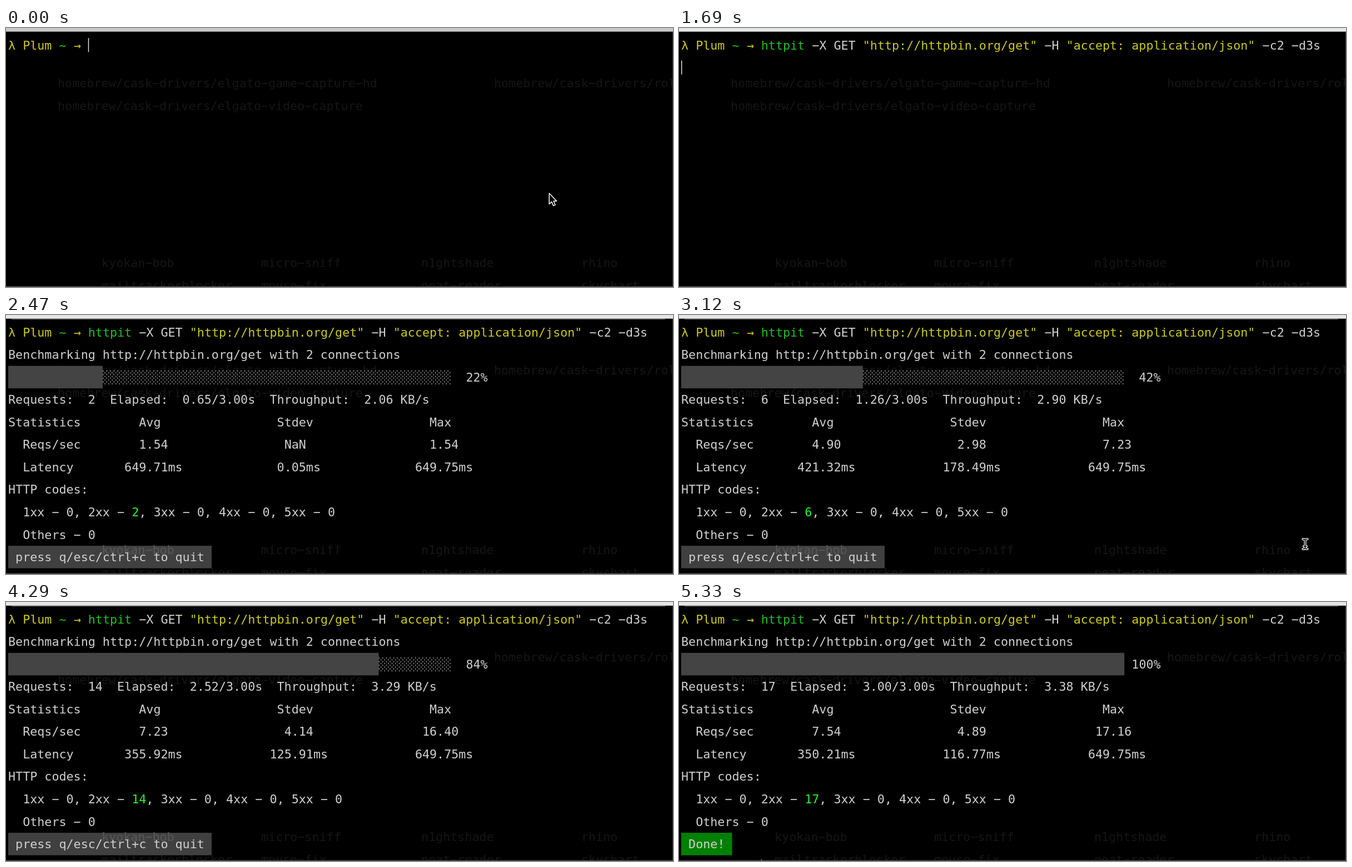
Animation of 1200x467 px, one loop 5850 ms. Source, as an HTML page:

```html
<!DOCTYPE html>
<html lang="en">
<head>
<meta charset="utf-8">
<title>Terminal benchmark</title>
<style>
html, body { margin: 0; width: 100%; height: 100%; overflow: hidden; background: #000; }
svg { display: block; width: 100%; height: 100%; }
text { font: 21.71px "DejaVu Sans Mono", monospace; white-space: pre; }
</style>
</head>
<body>
<svg id="stage" viewBox="0 0 1200 467" xmlns="http://www.w3.org/2000/svg">
  <rect width="1200" height="467"/>
  <g id="ghost" fill="#151515"></g>
  <g id="screen"></g>
  <rect id="title" width="1200" height="6.6"/>
  <rect id="seam" x="10" y="6.2" width="1176" height="1.6" fill="#8c8c8c"/>
  <rect x="1198.6" y="7" width="1.4" height="460" fill="#2c2a2a"/>
  <rect y="465.4" width="1200" height="1.6" fill="#4a4344"/>
  <path id="arrow" transform="translate(977.3 298)" d="M0 0V19.4L4.4 15.4L7.4 22.4L10.8 21L7.9 14.1H13.4Z"
    stroke="#fff" stroke-width="1.5" stroke-linejoin="round"/>
  <g id="beam" fill="none" stroke-linecap="round">
    <path id="beamEdge" stroke="#fff" stroke-width="4.2" d="M-4-9Q0-9 0-6V6Q0 9-4 9M4-9Q0-9 0-6M0 6Q0 9 4 9M-2.5 4H2.5"/>
    <path stroke="#000" stroke-width="1.6" d="M-4-9Q0-9 0-6V6Q0 9-4 9M4-9Q0-9 0-6M0 6Q0 9 4 9M-2.5 4H2.5"/>
  </g>
</svg>
<script>
const LOOP = 5850, TICK = 130;
const CELL = 13.07, ROW = 40.55, LEFT = 4, TOP = 10.6;
const BAR_CELLS = 61, PROMPT_CELLS = 11;
const LIGHT = '#d0d0d0', YELLOW = '#cbc91f', GREEN = '#1fc023', BRIGHT = '#27f52b', DIM = '#666';

const $ = id => document.getElementById(id);
const colX = col => LEFT + col * CELL;
const rowY = row => TOP + row * ROW;
const escapeText = s => s.replace(/&/g, '&amp;').replace(/</g, '&lt;');

// The terminal face has wide hyphens, so they are set as minus signs.
const textAt = (x, y, s, fill) =>
  `<text x="${x}" y="${y}"${fill ? ` fill="${fill}"` : ''}>${escapeText(s).replace(/-/g, '\u2212')}</text>`;
const put = (row, col, s, fill = LIGHT) => textAt(colX(col), rowY(row) + 28, s, fill);
const block = (row, col, cells, fill) =>
  `<rect x="${colX(col)}" y="${rowY(row)}" width="${cells * CELL}" height="${ROW}" fill="${fill}"/>`;
const caret = (row, col) =>
  `<rect x="${colX(col)}" y="${rowY(row) + 7.6}" width="1.4" height="25" fill="#eee"/>`;
const centred = (row, mid, s) => put(row, mid - Math.ceil(s.length / 2), s);

function run(row, col, parts) {
  return parts.map(([s, fill]) => {
    const out = put(row, col, s, fill);
    col += s.length;
    return out;
  }).join('');
}

const COMMAND = [
  ['httpit', GREEN], [' -X GET ', LIGHT], ['"http://httpbin.org/get"', YELLOW],
  [' -H ', LIGHT], ['"accept: application/json"', YELLOW], [' -c2 -d3s', LIGHT]
];
const LINE = COMMAND.map(p => p[0]).join('');

// start, requests, elapsed, throughput, request rates, latencies
const STATES = [
  [1820, 0, 0, '0.00 B/s', '0.00 NaN 0.00', '0.00us NaN 0.00us'],
  [2470, 2, 0.65, '2.06 KB/s', '1.54 NaN 1.54', '649.71ms 0.05ms 649.75ms'],
  [2730, 4, 0.95, '2.61 KB/s', '4.38 4.02 7.23', '478.64ms 197.40ms 649.75ms'],
  [3120, 6, 1.26, '2.90 KB/s', '4.90 2.98 7.23', '421.32ms 178.49ms 649.75ms'],
  [3380, 8, 1.57, '3.08 KB/s', '5.31 2.58 7.23', '392.65ms 160.93ms 649.75ms'],
  [3640, 10, 1.88, '3.19 KB/s', '5.55 2.29 7.23', '375.46ms 145.61ms 649.75ms'],
  [4030, 12, 2.20, '3.25 KB/s', '5.83 2.17 7.23', '364.05ms 134.86ms 649.75ms'],
  [4290, 14, 2.52, '3.29 KB/s', '7.23 4.14 16.40', '355.92ms 125.91ms 649.75ms'],
  [4680, 16, 2.86, '3.33 KB/s', '7.61 4.83 17.16', '351.46ms 119.62ms 649.75ms'],
  [4810, 16, 3.00, '3.18 KB/s', '7.61 4.83 17.16', '351.46ms 119.62ms 649.75ms'],
  [5200, 17, 3.00, '3.38 KB/s', '7.54 4.89 17.16', '350.21ms 116.77ms 649.75ms']
];

// start, x, y; without a place the pointer is hidden
const BEAM = [[780, 978, 300], [1040], [2990, 1047, 356], [3120, 1126.5, 413], [3250, 1155, 455], [3380]];
const latest = (list, t) => list.filter(s => s[0] <= t).pop();

function prompt() {
  return run(0, 0, [['λ Plum ', YELLOW], ['~ ', GREEN], ['→', YELLOW]]);
}

function commandLine(t) {
  if (t < 1040) return caret(0, PROMPT_CELLS);
  if (t >= 1430) {
    const end = t < 1690 ? caret(0, PROMPT_CELLS + LINE.length) : '';
    return run(0, PROMPT_CELLS, COMMAND) + end;
  }
  const typed = 1 + (t - 1040) / TICK;
  return run(0, PROMPT_CELLS, [[LINE.slice(0, typed), GREEN], [LINE.slice(typed), DIM]]) +
    caret(0, PROMPT_CELLS + typed);
}

function statsRow(row, label, values) {
  return put(row, 0, label) + values.split(' ').map((v, i) => centred(row, 20 * (i + 1), v)).join('');
}

function report(t) {
  const [, count, elapsed, speed, rates, delays] = latest(STATES, t);
  const part = elapsed / 3, filled = Math.floor(BAR_CELLS * part);
  const percent = Math.round(part * 100) + '%';
  const done = t >= 5200;
  let out = put(1, 0, 'Benchmarking http://httpbin.org/get with 2 connections');
  out += block(2, 0, filled, '#444') + put(2, filled, '░'.repeat(BAR_CELLS - filled), '#858585');
  out += put(2, 66 - percent.length, percent);
  out += put(3, 0, `Requests:  ${count}  Elapsed:  ${elapsed.toFixed(2)}/3.00s  Throughput:  ${speed}`);
  out += statsRow(4, 'Statistics', 'Avg Stdev Max');
  out += statsRow(5, '  Reqs/sec', rates) + statsRow(6, '  Latency', delays);
  out += put(7, 0, 'HTTP codes:');
  out += run(8, 0, [['  1xx - 0, 2xx - ', LIGHT], [String(count), BRIGHT], [', 3xx - 0, 4xx - 0, 5xx - 0', LIGHT]]);
  out += put(9, 0, '  Others - 0');
  if (done) return out + block(10, 0, 7, '#008000') + put(10, 1, 'Done!') + caret(11, PROMPT_CELLS);
  return out + block(10, 0, 28, '#404040') + textAt(172, 431, 'kyokan-bob', '#585858') +
    put(10, 1, 'press q/esc/ctrl+c to quit');
}

function draw(time) {
  const t = Math.floor(time % LOOP / TICK) * TICK;
  let out = prompt() + commandLine(t);
  if (t >= 1820) out += report(t);
  else if (t >= 1690) out += caret(1, 0);
  $('screen').innerHTML = out;

  $('title').setAttribute('fill', t < 780 ? '#c8c8c9' : '#e5e6e7');
  $('seam').style.display = t < 1820 ? 'none' : '';
  $('arrow').style.display = t < 780 ? '' : 'none';
  const [, x, y] = latest(BEAM, t) || [];
  $('beam').style.display = x ? '' : 'none';
  if (x) $('beam').setAttribute('transform', `translate(${x} ${y})`);
}

$('ghost').innerHTML = [
  [93, 107, 'homebrew/cask-drivers/elgato-game-capture-hd'],
  [878, 107, 'homebrew/cask-drivers/rol'],
  [93, 147.5, 'homebrew/cask-drivers/elgato-video-capture'],
  [172, 431, 'kyokan-bob'], [459, 431, 'micro-sniff'], [747, 431, 'n1ghtshade'], [1035, 431, 'rhino'],
  [172, 471.5, 'mailtrackerblocker'], [459, 471.5, 'mouse-fix'],
  [747, 471.5, 'neat-reader'], [1035, 471.5, 'skychart']
].map(g => textAt(...g)).join('');

let shown = -1;
function loop() {
  const now = performance.now(), step = Math.floor(now % LOOP / TICK);
  if (step !== shown) draw(now);
  shown = step;
  requestAnimationFrame(loop);
}
loop();
</script>
</body>
</html>
```
